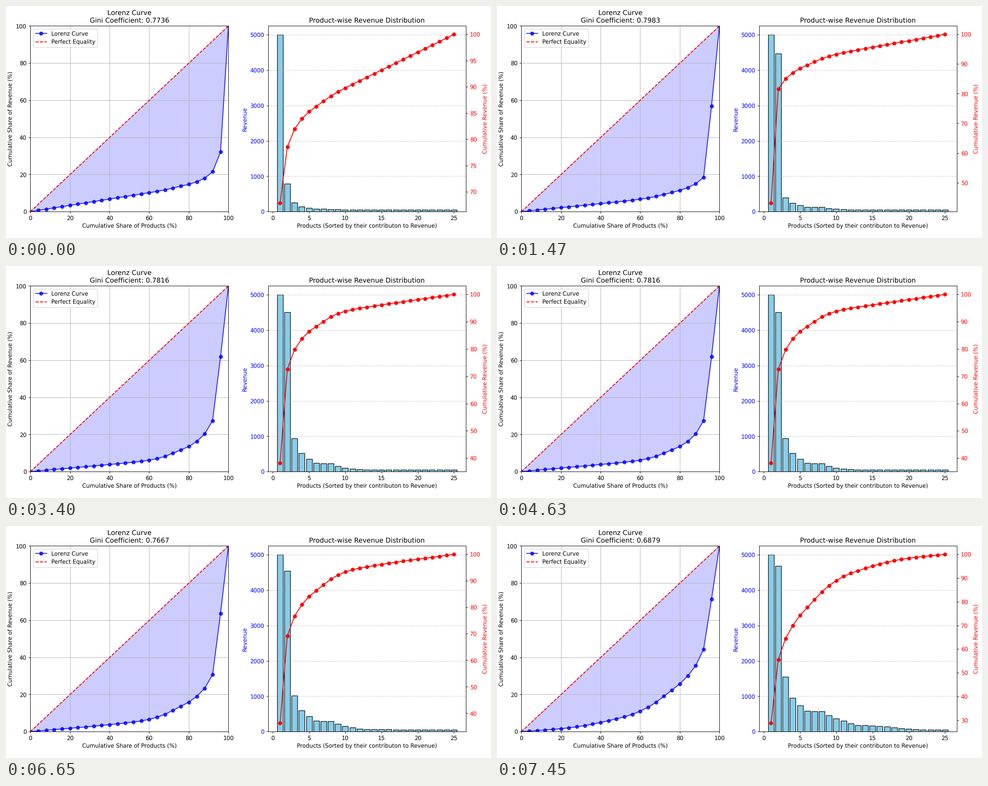
A matplotlib script that plays this animation: 1082 px wide and 517 px high, repeating every 8 s.

```python
import numpy as np
import matplotlib.pyplot as plt
from matplotlib.animation import FuncAnimation

W, H = 1082, 517
DPI = W / 12
INTERVAL, LOOP = 50, 8000
COUNT, FLOOR, CAP = 25, 50, 5000

# Start in ms, Gini coefficient, revenue of the second and third product.
STAGES = [
    (0, 0.7736, 787, 253),
    (1470, 0.7983, 4470, 400),
    (3400, 0.7816, 4508, 942),
    (5450, 0.7667, 4545, 1024),
    (7450, 0.6879, 4685, 1551),
]

# Shape of the tail: revenue above FLOOR at a few ranks, log-linear between.
KNOT_RANKS = [3, 4, 6, 8, 11, 13, 16, 17, 20, 22, 25]
KNOT_EXCESS = [1501, 904, 536, 523, 257, 137, 110, 90, 36, 7, 1]

plt.rcParams.update({"font.family": "DejaVu Sans", "text.hinting": "none"})

products = np.arange(1, COUNT + 1)
pct = np.linspace(0, 100, COUNT + 1)
log_tail = np.interp(products[2:], KNOT_RANKS, np.log(KNOT_EXCESS))
drop = log_tail[0] - log_tail


def share(values):
    return 100 * np.cumsum(values) / values.sum()


def lorenz(values):
    return np.concatenate([[0], share(values[::-1])])


def gini(values):
    weights = products[::-1]
    return (2 * (weights @ values) / (COUNT * values.sum())
            - (COUNT + 1) / COUNT)


def revenue(second, third, bend):
    """The tail falls from the third product; bend makes it fall faster."""
    tail = FLOOR + (third - FLOOR) * np.exp(-drop - bend * drop ** 2)
    return np.concatenate([[CAP, second], tail])


def solve(goal, second, third):
    """Find by bisection the bend that gives the wanted Gini coefficient."""
    low, high = -0.02, 3
    for _ in range(40):
        mid = (low + high) / 2
        if gini(revenue(second, third, mid)) < goal:
            low = mid
        else:
            high = mid
    return revenue(second, third, low)


STARTS = [round(stage[0] / INTERVAL) for stage in STAGES]
REVENUES = [solve(*stage[1:]) for stage in STAGES]


def add_axes(x0, x1, top=44.5, bottom=458.2):
    return fig.add_axes([x0 / W, 1 - bottom / H, (x1 - x0) / W,
                         (bottom - top) / H])


fig = plt.figure(figsize=(12 + 1e-6, H / DPI + 1e-6), dpi=DPI,
                 facecolor="white")
first = REVENUES[0]

left = add_axes(54.4, 496.2)
curve, = left.plot(pct, lorenz(first), "o-", color="blue", alpha=0.8,
                   label="Lorenz Curve")
left.plot([0, 100], [0, 100], "--", color="red", label="Perfect Equality")
area = left.fill_between(pct, lorenz(first), pct, color="blue", alpha=0.2)
left.set(xlim=(0, 100), ylim=(0, 100),
         xlabel="Cumulative Share of Products (%)",
         ylabel="Cumulative Share of Revenue (%)")
title = left.set_title("Lorenz Curve\nGini Coefficient: 0")
left.grid(True)
left.legend(loc="upper left")

right = add_axes(584.9, 1025.9)
bars = right.bar(products, first, color="skyblue", edgecolor="black")
right.set_title("Product-wise Revenue Distribution")
right.set_xlabel("Products (Sorted by their contributon to Revenue)")
right.set_ylabel("Revenue", color="blue")
right.tick_params(axis="y", labelcolor="blue")
right.grid(axis="y", linestyle="--", alpha=0.7)

twin = right.twinx()
total, = twin.plot(products, share(first), "o-", color="red")
twin.set_ylabel("Cumulative Revenue (%)", color="red")
twin.tick_params(axis="y", labelcolor="red")


def show(values):
    low = lorenz(values)
    curve.set_ydata(low)
    area.set_verts([np.column_stack([np.r_[pct, pct[::-1]],
                                     np.r_[low, pct[::-1]]])])
    title.set_text(f"Lorenz Curve\nGini Coefficient: {gini(values):.4f}")
    for bar, value in zip(bars, values):
        bar.set_height(value)
    cumulative = share(values)
    total.set_ydata(cumulative)
    pad = 0.05 * (100 - cumulative[0])
    twin.set_ylim(cumulative[0] - pad, 100 + pad)


def update(frame):
    stage = np.searchsorted(STARTS, frame, side="right") - 1
    show(REVENUES[stage])
    return []


def reset():
    return update(0)


anim = FuncAnimation(fig, update, frames=LOOP // INTERVAL, init_func=reset,
                     interval=INTERVAL, repeat=True, repeat_delay=0)
plt.show()
```
